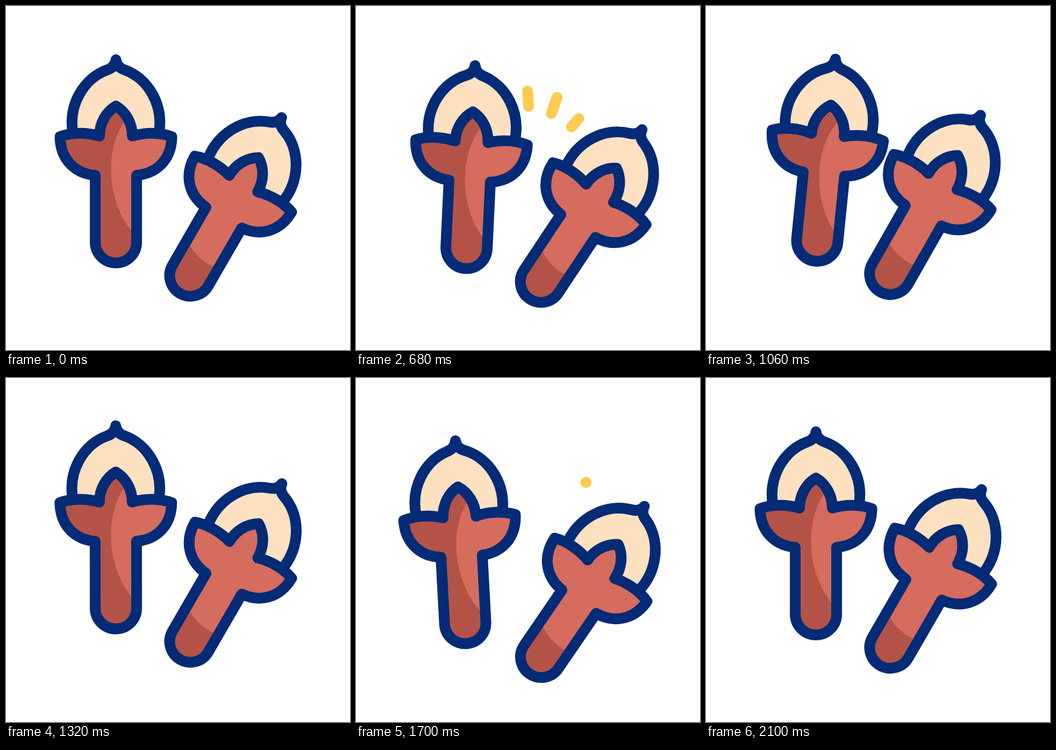
Write an HTML page that moves like this. It is 640 by 640 pixels and loops after 2420 ms.

```html
<!DOCTYPE html>
<html lang="en">
<head>
<meta charset="utf-8">
<title>Cloves</title>
<style>
  html, body { margin: 0; height: 100%; overflow: hidden; background: #fff; }
  svg { display: block; width: 100vw; height: 100vh; }
  .line { fill: none; stroke: #032b76; stroke-width: 20; stroke-linecap: round; stroke-linejoin: round; }
  .shade { fill: #b35347; }
  #sparks { stroke: #ffcb4f; stroke-width: 20; stroke-linecap: round; }
</style>
</head>
<body>
<svg viewBox="0 0 640 640">
  <defs>
    <path id="calyx" d="M166 439.5V315C130 312 101 287 100.5 243C122 235 150 235 174 242C174 218 186 197 204.5 186C223 197 235 218 235 242C259 235 287 235 308.5 243C308 287 279 312 243 315V439.5A38.5 38.5 0 0 1 166 439.5Z"/>
    <path id="bud" d="M125 240C114 183 146 134 188 119Q203 114 204.5 100Q206 114 221 119C263 134 295 183 284 240"/>
    <clipPath id="inside"><use href="#calyx"/></clipPath>
  </defs>
  <g id="sparks"></g>
  <g id="left">
    <use href="#bud" fill="#fde1c0"/><use href="#bud" class="line"/>
    <use href="#calyx" fill="#d56c5e"/>
    <path class="shade" clip-path="url(#inside)" d="M228 205C183 255 183 360 238 424V490H90V170H228Z"/>
    <use href="#calyx" class="line"/>
  </g>
  <g id="right">
    <use href="#bud" fill="#fde1c0"/><use href="#bud" class="line"/>
    <use href="#calyx" fill="#d56c5e"/>
    <path class="shade" clip-path="url(#inside)" d="M166 386Q205 411 244 402V490H166Z"/>
    <use href="#calyx" class="line"/>
  </g>
</svg>
<script>
const LOOP = 2420, REST = 180, STEP = 20, LAST = 96;
const PIVOT = '204.5 464';

// Keys are [step, value]
const bob = [[0, 0], [12, -15], [31, 18], [53, -15], [71, 18], [96, 0]];
const swing = [[0, 0], [10, -4.1], [21, 6.3], [31, -4.1], [42.5, 6.3], [52.5, -4.1], [63, 6.3], [73, -4.1], [82, 0]];
const recoil = [[20.5, 0], [29.5, 7.2], [42, -0.4], [52, 0], [63, 0.2], [71.5, 7.2], [82, 0]];

// Inner end, direction, length and start step of each ray
const rays = [
  { x: 321, y: 187, dx: -0.07, dy: -1, len: 40, start: 20.5 },
  { x: 363.5, y: 200, dx: 0.33, dy: -0.944, len: 52, start: 21 },
  { x: 401, y: 225, dx: 0.657, dy: -0.754, len: 41, start: 21.5 }
];
const HITS = [0, 42.5];

const $ = id => document.getElementById(id);
const clamp = v => Math.min(1, Math.max(0, v));
const ease = v => (1 - Math.cos(Math.PI * clamp(v))) / 2;

function at(keys, s) {
  const next = keys.findIndex(k => k[0] > s);
  if (next === 0) return keys[0][1];
  if (next < 0) return keys[keys.length - 1][1];
  const [s0, v0] = keys[next - 1], [s1, v1] = keys[next];
  return v0 + (v1 - v0) * ease((s - s0) / (s1 - s0));
}

for (const ray of rays) {
  ray.el = document.createElementNS('http://www.w3.org/2000/svg', 'line');
  $('sparks').append(ray.el);
}

function drawRay(ray, s) {
  const age = s - ray.start - (s < 50 ? HITS[0] : HITS[1]);
  const head = ease(age / 7) * ray.len;
  const tail = ease((age - 4) / 8.5) * ray.len;
  const show = age > 0 && age < 12.5;
  ray.el.setAttribute('visibility', show ? 'visible' : 'hidden');
  ray.el.setAttribute('x1', ray.x + ray.dx * tail);
  ray.el.setAttribute('y1', ray.y + ray.dy * tail);
  ray.el.setAttribute('x2', ray.x + ray.dx * head);
  ray.el.setAttribute('y2', ray.y + ray.dy * head);
}

function draw(now) {
  const t = now % LOOP;
  const s = Math.min(LAST, Math.max(0, Math.floor((t - REST) / STEP)));
  const y = at(bob, s);
  $('left').setAttribute('transform', `translate(0 ${y}) rotate(${at(swing, s)} ${PIVOT})`);
  $('right').setAttribute('transform',
    `translate(343 ${501.5 + y}) rotate(30) translate(-204.5 -439.5) rotate(${at(recoil, s)} ${PIVOT})`);
  rays.forEach(ray => drawRay(ray, s));
}

const begin = performance.now();
function tick() {
  draw(performance.now() - begin);
  requestAnimationFrame(tick);
}
tick();
</script>
</body>
</html>
```
